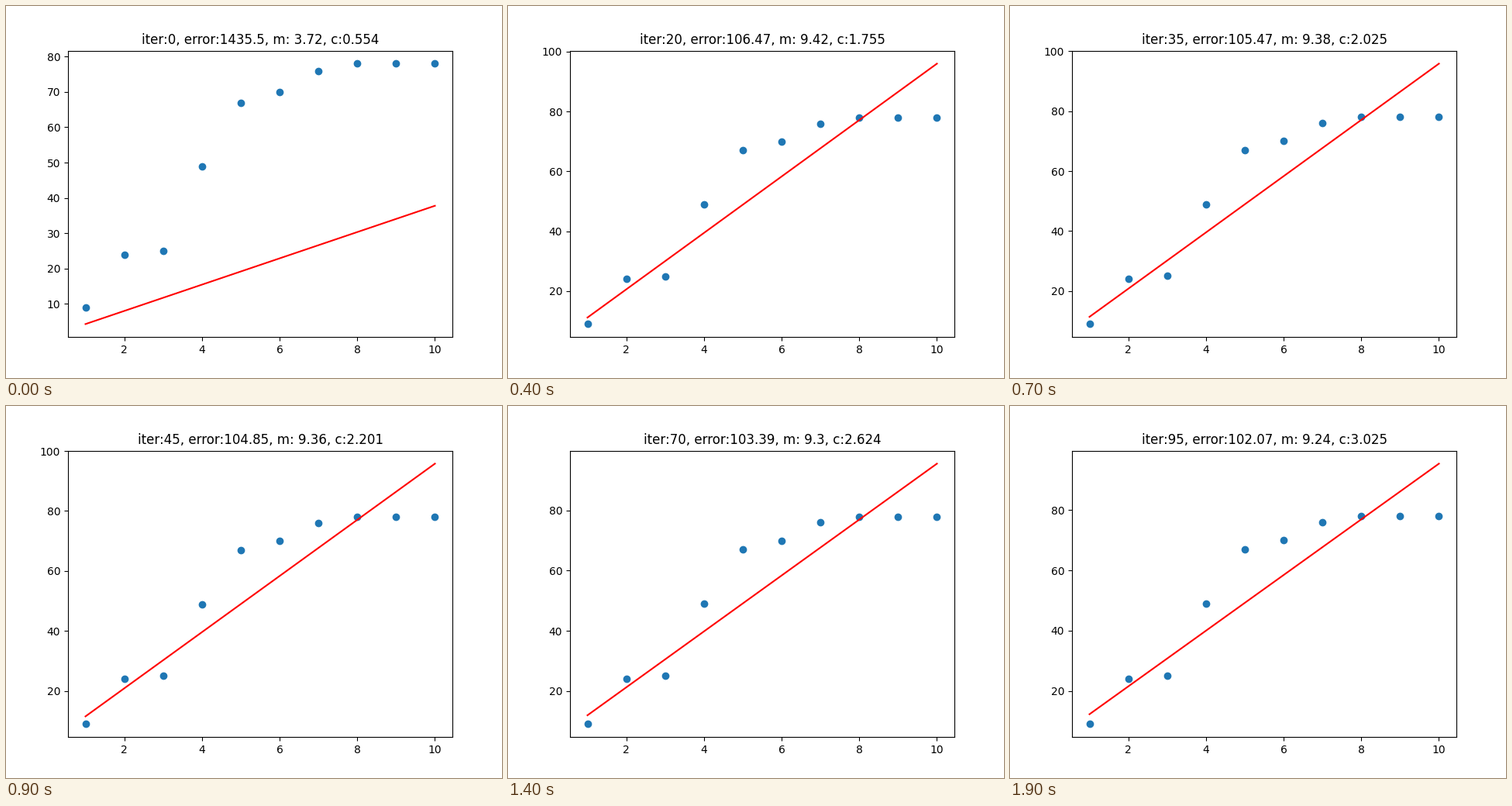
These frames come from a looping animation (640 by 480 pixels, 2000 ms). A matplotlib script:

```python
import numpy as np
import matplotlib.pyplot as plt
from matplotlib.animation import FuncAnimation

FRAMES, INTERVAL = 20, 100
STEPS_PER_FRAME = 5
RATE = 0.01

x = np.arange(1, 11)
y = np.array([9, 24, 25, 49, 67, 70, 76, 78, 78, 78])

fig, ax = plt.subplots(figsize=(6.4, 4.8), dpi=100)


def fit(updates):
    """Slope and intercept after some gradient descent updates from zero."""
    m = c = 0.0
    for _ in range(updates):
        residual = y - (m * x + c)
        m, c = m + RATE * np.mean(x * residual), c + RATE * np.mean(residual)
    return m, c


def draw(frame):
    step = frame * STEPS_PER_FRAME
    m, c = fit(step + 1)
    line = m * x + c
    error = np.mean((y - line) ** 2)

    ax.clear()
    ax.scatter(x, y)
    ax.plot(x, line, color="red")
    ax.set_title(f"iter:{step}, error:{round(float(error), 2)}, "
                 f"m: {round(float(m), 2)}, c:{round(float(c), 3)}")


anim = FuncAnimation(fig, draw, frames=FRAMES, interval=INTERVAL,
                     init_func=lambda: draw(0), repeat=True, repeat_delay=0)
plt.show()
```
